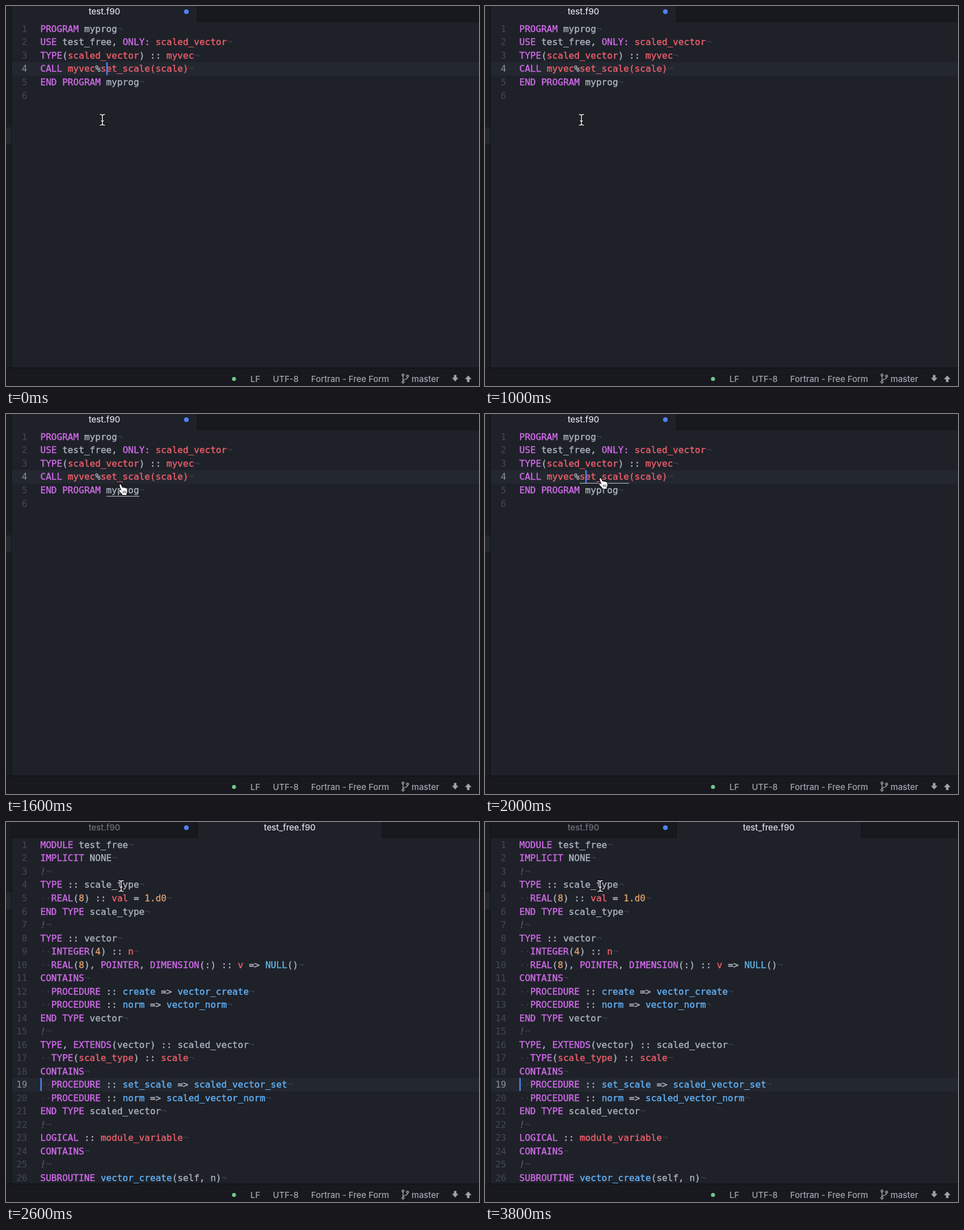
An HTML page with a canvas that plays this animation: 834 by 671 pixels, repeating every 4000 ms.

```html
<!DOCTYPE html>
<html lang="en">
<head>
<meta charset="utf-8">
<title>Go to definition</title>
<style>
html, body { margin: 0; width: 100%; height: 100%; overflow: hidden; background: #1e2128; }
canvas { display: block; }
</style>
</head>
<body>
<canvas id="stage" width="834" height="671"></canvas>
<script>
const ctx = document.getElementById('stage').getContext('2d');
const LOOP = 4000, STEP = 200, OPEN_AT = 2200;
const LEFT = 60.5, CHAR = 9.675, LINE = 23.52;
const CODE = '16.07px "DejaVu Sans Mono", monospace';
const UI = '500 14.85px Inter, sans-serif';
const GREY = '#abb2bf', PURPLE = '#cd6ae6', DIM = '#3b4048';
const BAR = '#17191e', PAPER = '#1e2128', EDGE = '#0f1114', BLUE = '#4c82f0';

// A mark before a token picks its colour; plain capitals are keywords.
const MARKS = { '#': '#ec5f6b', '@': '#61b2f8', '$': '#d99c6c', '^': '#5fb2e2', '&': PURPLE, '~': GREY };

const caller = `PROGRAM myprog
USE test_free, ONLY&: #scaled_vector
TYPE(#scaled_vector) :: #myvec
CALL #myvec%#set_scale#(#scale#)
END PROGRAM myprog
`.split('\n');

const library = `MODULE test_free
IMPLICIT ~NONE
!
TYPE :: scale_type
  REAL($8) :: #val = $1.d0
END TYPE scale_type
!
TYPE :: vector
  INTEGER($4) :: #n
  REAL($8), POINTER, DIMENSION(:) :: #v => ^NULL()
CONTAINS
  PROCEDURE :: @create => @vector_create
  PROCEDURE :: @norm => @vector_norm
END TYPE vector
!
TYPE, EXTENDS(vector) :: scaled_vector
  TYPE(#scale_type) :: #scale
CONTAINS
  PROCEDURE :: @set_scale => @scaled_vector_set
  PROCEDURE :: @norm => @scaled_vector_norm
END TYPE scaled_vector
!
LOGICAL :: #module_variable
CONTAINS
!
SUBROUTINE @vector_create(self, n)`.split('\n');

function rect(color, x, y, w, h) {
  ctx.fillStyle = color;
  ctx.fillRect(x, y, w, h);
}

function text(s, x, y, color, font, align = 'left') {
  ctx.font = font;
  ctx.textAlign = align;
  ctx.fillStyle = color;
  ctx.fillText(s, x, y);
}

// Code is set slightly heavier than the regular face.
function codeText(s, x, y, color, font = CODE) {
  text(s, x, y, color, font);
  ctx.strokeStyle = color;
  ctx.lineWidth = 0.4;
  ctx.strokeText(s, x, y);
}

function dot(color, x, y, r) {
  ctx.fillStyle = color;
  ctx.beginPath();
  ctx.arc(x, y, r, 0, 7);
  ctx.fill();
}

function drawLine(line, y) {
  let col = 0;
  const put = (s, color, font) => {
    codeText(s, LEFT + col * CHAR, y, color, font);
    col += s.length;
  };
  const putHidden = s => text(s, LEFT + col++ * CHAR, y, DIM, CODE);
  for (const [, mark, token] of line.matchAll(/([#@$^&~]?)(\w+(?:\.\w+)?|.)/g)) {
    if (token === ' ') {
      if (line.startsWith('  ') && col < 2) putHidden('·');
      else col++;
    } else if (token === '!') put(token, '#50565f', 'italic ' + CODE);
    else put(token, MARKS[mark] || (/^[A-Z]+$/.test(token) ? PURPLE : GREY));
  }
  if (line) putHidden('¬');
}

function drawCode(lines, current, caretX, caretOn) {
  const top = Math.round(28.3 + (current - 1) * LINE);
  rect('#23272f', 10, top, 824, 24);
  lines.forEach((line, i) => {
    const y = 45.9 + i * LINE;
    const active = i + 1 === current;
    text(i + 1, 37.5, y, active ? '#8c929c' : '#434850', CODE, 'right');
    drawLine(line, y);
  });
  if (caretOn) rect(BLUE, caretX, top, 2.5, 23);
}

function drawTabs(opened) {
  if (opened) rect(BAR, 10, 0, 327, 28);
  rect(BAR, opened ? 664 : 338, 0, 500, 28);
  rect(EDGE, 337, 0, 1, 28);
  if (opened) {
    rect(EDGE, 10, 27, 328, 1);
    rect(EDGE, 663, 0, 1, 28);
    text('test_free.f90', 500.3, 15, '#dcdfe5', UI, 'center');
  }
  rect(EDGE, opened ? 663 : 337, 27, 500, 1);
  text('test.f90', 173.5, 15, opened ? '#6c727c' : '#dcdfe5', UI, 'center');
  dot(BLUE, 318, 10, 4.3);
}

function drawStatus() {
  rect(BAR, 0, 639, 834, 32);
  rect(EDGE, 0, 638.5, 834, 1.2);
  dot('#6fc98d', 402, 658.5, 3.6);
  const color = '#9ea4ae';
  text('LF', 431, 663.5, color, UI);
  text('UTF-8', 470.5, 663.5, color, UI);
  text('Fortran - Free Form', 538, 663.5, color, UI);
  text('master', 715, 663.5, color, UI);
  ctx.strokeStyle = color;
  ctx.lineWidth = 1.4;
  for (const [x, y] of [[700, 651.5], [700, 664], [708, 653.5]]) {
    ctx.beginPath();
    ctx.arc(x, y, 1.8, 0, 7);
    ctx.stroke();
  }
  ctx.stroke(new Path2D('M700 653.5V662M708 655.5Q708 658.5 704 659.3Q700 660 700 662'));
  ctx.fillStyle = color;
  ctx.fill(new Path2D('M789.8 651.5h4.4v5h3.6l-5.8 6.5-5.8-6.5h3.6z M812.8 664h4.4v-5h3.6l-5.8-6.5-5.8 6.5h3.6z'));
}

const BEAM = new Path2D('M-4 -9.5Q0 -9.5 0 -7Q0 -9.5 4 -9.5M0 -7V7M-4 9.5Q0 9.5 0 7Q0 9.5 4 9.5M-2 2H2');
const HAND = new Path2D('M-1.5 1.5Q-1 -1 1 .3L4 6Q5 4.5 6.5 6Q8 5 9.2 6.7Q11.5 6 12 9L12.3 13L11 16V18.5H3.5V17L-1.8 11.5Q-2.5 9 0 9.5L2 11Z');

function drawPointer(x, y, hand) {
  ctx.save();
  ctx.translate(x, y);
  ctx.lineJoin = ctx.lineCap = 'round';
  ctx.strokeStyle = '#0b0c0e';
  ctx.lineWidth = hand ? 2 : 3.4;
  ctx.stroke(hand ? HAND : BEAM);
  if (hand) {
    ctx.fillStyle = '#fff';
    ctx.fill(HAND);
    ctx.lineWidth = 0.8;
    ctx.stroke(new Path2D('M5 11.5V15M7.3 11.5V15M9.6 11.5V15'));
  } else {
    ctx.strokeStyle = '#f4f4f4';
    ctx.lineWidth = 1.5;
    ctx.stroke(BEAM);
  }
  ctx.restore();
}

function pointerAt(t) {
  if (t < 1200) return [170, 201, false];
  if (t < 1400) return [172, 191, false];
  if (t < 1600) return [190, 150, false];
  if (t < 1800) return [201.5, 124.5, true];
  if (t < OPEN_AT) return [203.5, 113.5, true];
  return [203, 113, false];
}

function draw(now) {
  const t = Math.floor(now % LOOP / STEP) * STEP;
  const opened = t >= OPEN_AT;
  rect(PAPER, 0, 0, 834, 671);
  rect('#191c20', 0, 0, 9, 639);
  rect('#23272d', 0, opened ? 124 : 214, 9, 30);
  rect(EDGE, 9, 0, 1, 639);
  if (opened) drawCode(library, 19, 60.5, true);
  else drawCode(caller, 4, 176.8, t < 800 || t >= 1800);
  if (t >= 1600 && t < 1800) rect(GREY, 177, 144.7, 58, 1.2);
  if (t >= 1800 && !opened) rect(GREY, 167, 121.7, 87, 1.2);
  drawTabs(opened);
  drawStatus();
  drawPointer(...pointerAt(t));
  requestAnimationFrame(draw);
}
requestAnimationFrame(draw);
</script>
</body>
</html>
```
